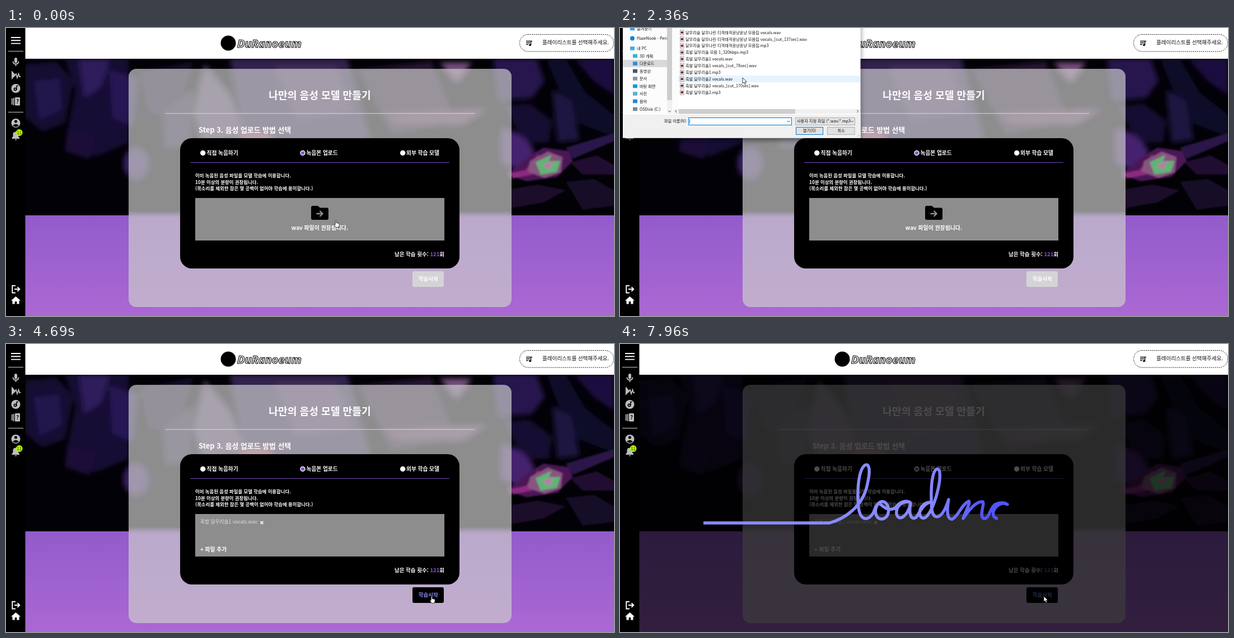
Animation, 1086 px wide and 515 px high, one loop 8000 ms. Source, as an HTML page:

```html
<!DOCTYPE html>
<html lang="ko">
<head>
<meta charset="utf-8">
<title>음성 모델 만들기</title>
<style>
  html, body { margin: 0; width: 100%; height: 100%; overflow: hidden; background: #000; }
  svg { display: block; width: 100vw; height: 100vh; }
  text { font-family: "Noto Sans CJK KR", "Noto Sans CJK", sans-serif; font-weight: 900; fill: #fff; white-space: pre; }
  #dialog text { font-size: 7.2px; font-weight: 400; fill: #111; }
  .mid { text-anchor: middle; }
  .end { text-anchor: end; }
  .medium { font-weight: 700; }
  .icon { fill: #bdbdbd; }
  .line { fill: none; stroke: #bdbdbd; stroke-width: 1.8; }
</style>
</head>
<body>
<svg viewBox="0 0 1086 515" preserveAspectRatio="none">
  <defs>
    <linearGradient id="floor" x2="0" y2="1"><stop stop-color="#925bcb"/><stop offset="1" stop-color="#ab68d3"/></linearGradient>
    <linearGradient id="ink" gradientUnits="userSpaceOnUse" x1="550" x2="645">
      <stop stop-color="#898aff"/><stop offset="1" stop-color="#5355f8"/>
    </linearGradient>
    <filter id="soft" x="-20%" y="-20%" width="140%" height="140%"><feGaussianBlur stdDeviation="5"/></filter>
    <filter id="softer" x="-20%" y="-20%" width="140%" height="140%"><feGaussianBlur stdDeviation="1.5"/></filter>
    <filter id="frost"><feGaussianBlur stdDeviation="3.5"/></filter>
    <filter id="shade" x="-10%" y="-10%" width="120%" height="130%"><feDropShadow dx="0" dy="4" stdDeviation="5" flood-opacity=".5"/></filter>
    <clipPath id="stageClip"><rect x="34" y="55" width="1052" height="280"/></clipPath>
    <clipPath id="cardClip"><rect x="219" y="73" width="684" height="426" rx="14"/></clipPath>
    <clipPath id="navClip"><rect x="5" y="-20" width="79" height="175"/></clipPath>
  </defs>

  <g id="backdrop">
    <rect x="34" y="55" width="1052" height="280" fill="#020106"/>
    <g clip-path="url(#stageClip)">
      <g filter="url(#soft)">
        <path d="M34 65 90 60 120 95 105 170 65 185 34 160Z" fill="#150d33"/>
        <path d="M50 95 95 90 100 145 60 165Z" fill="#24164d"/>
        <path d="M105 55H219V205L160 230 110 185 125 110Z" fill="#170e36"/>
        <path d="M130 55H185L170 105 140 125Z" fill="#2d1b5c"/>
        <path d="M185 75 235 90 225 175 190 160Z" fill="#281852"/>
        <path d="M110 180 160 195 150 235 105 220Z" fill="#1b1038"/>
        <ellipse cx="232" cy="242" rx="22" ry="28" fill="#3b2463"/>
        <path d="M240 80 335 60 300 160 255 150Z" fill="#160f2c"/>
        <path d="M355 65 400 120 430 195 350 205 335 150Z" fill="#59456b"/>
        <path d="M280 150 335 110 330 210 285 215Z" fill="#281b3d"/>
        <path d="M400 55H610L650 200 480 250 420 170Z" fill="#33204d"/>
        <path d="M480 70H590L620 150 520 165Z" fill="#48315d"/>
        <ellipse cx="445" cy="197" rx="30" ry="11" fill="#a54f68"/>
        <path d="M630 75 760 60 800 165 690 190Z" fill="#251631"/>
        <path d="M675 155 860 145 815 172 700 170Z" fill="#5d3b5b"/>
        <path d="M775 62H832L805 98Z" fill="#75507d"/>
        <path d="M870 55H948L962 95 940 125 880 130Z" fill="#28164e"/>
        <path d="M890 140 935 135 975 165 970 205 925 205Z" fill="#180d33"/>
        <path d="M885 180Q925 185 945 222L928 262 885 240Z" fill="#44226e"/>
        <path d="M965 55H1000L1035 115 1086 155V195L1010 165Z" fill="#110a2a"/>
        <path d="M1015 55H1086V120L1050 95Z" fill="#1c1140"/>
        <path d="M975 110 1010 130 1025 200 985 205Z" fill="#1e123f"/>
      </g>
      <g filter="url(#softer)">
        <path d="M895 262 930 232 960 214 1005 220 1012 238 985 266 930 274Z" fill="#4b1857"/>
        <path d="M900 260 928 254 950 226 962 238 940 262 905 269Z" fill="#8d2a80"/>
        <path d="M936 238 968 221 994 231 991 258 962 268 932 257Z" fill="#87557f"/>
        <path d="M946 240 974 227 970 238 990 238 984 257 955 262Z" fill="#61b477"/>
        <path d="M957 246 977 237 972 253Z" fill="#b97da4"/>
        <path d="M1000 214 1086 188V202L1012 234Z" fill="#2a1448"/>
        <path d="M1008 240 1055 228 1086 245V262L1030 262Z" fill="#241033"/>
        <path d="M903 288 950 280 1000 290 960 312 903 322Z" fill="#1a0e2c"/>
        <path d="M1000 275 1050 270 1086 290V318L1030 325Z" fill="#170c28"/>
      </g>
    </g>
    <rect x="34" y="335" width="1052" height="180" fill="url(#floor)"/>
  </g>

  <g clip-path="url(#cardClip)">
    <use href="#backdrop" filter="url(#frost)"/>
    <rect x="219" y="73" width="684" height="426" fill="#ccc" fill-opacity=".69"/>
  </g>
  <text x="560.5" y="126.5" class="mid" font-size="18.2">나만의 음성 모델 만들기</text>
  <path d="M284 152.800H838" stroke="#dcd8e0"/>
  <text x="344" y="187" font-size="12.9">Step 3. 음성 업로드 방법 선택</text>
  <rect x="311" y="197" width="499" height="233" rx="21"/>
  <path d="M329 240.500H792" stroke="#7342bd"/>
  <g fill="#fff">
    <circle cx="351.7" cy="223.5" r="4.7"/>
    <circle cx="530" cy="223.5" r="4.7"/><circle cx="530" cy="223.5" r="3.3" fill="#8d52d8"/>
    <circle cx="708.7" cy="223.5" r="4.7"/>
  </g>
  <g font-size="9.7">
    <text x="358.5" y="227">직접 녹음하기</text>
    <text x="536.5" y="227">녹음본 업로드</text>
    <text x="715" y="227">외부 학습 모델</text>
  </g>
  <g font-size="8.4">
    <text x="338" y="267">이미 녹음된 음성 파일을 모델 학습에 이용합니다.</text>
    <text x="338" y="278.6">10분 이상의 분량이 권장됩니다.</text>
    <text x="338" y="290.4">(목소리를 제외한 잡은 몇 공백이 없어야 학습에 용이합니다.)</text>
  </g>
  <rect x="338" y="304" width="445" height="76" fill="#8d8d8d"/>
  <g id="emptyDrop">
    <path d="M548 318H557L561 321.500H573Q576 321.500 576 324.500V340Q576 343 573 343H548Q545 343 545 340V321Q545 318 548 318Z"/>
    <path d="M554.500 332H565M560.500 327 565.500 332 560.500 337" fill="none" stroke="#8d8d8d" stroke-width="2.3"/>
    <text x="560.5" y="360.7" class="mid medium" font-size="9.9">wav 파일이 권장됩니다.</text>
  </g>
  <g id="chosenFile">
    <text x="347" y="321.4" font-size="8.7" style="font-weight:300;fill:#e2e2e2">흑발 달무리솔1 vocals.wav</text>
    <path d="M454.500 317 459.500 322M459.500 317 454.500 322" stroke="#fff" stroke-width="1.7"/>
    <text x="347" y="370.5" class="medium" font-size="9.8">+ 파일 추가</text>
  </g>
  <text x="783" y="407.8" class="end medium" font-size="9.5">남은 학습 횟수: <tspan fill="#8d52d8">121</tspan>회</text>
  <rect id="startButton" x="726" y="435" width="56" height="28" rx="3"/>
  <text id="startLabel" x="754.2" y="452" class="mid medium" font-size="9.5">학습시작</text>

  <rect x="34" width="1052" height="55" fill="#fff"/>
  <circle cx="397" cy="27" r="13.5"/>
  <text x="413" y="35" font-size="20" style="font-family:'Open Sans',sans-serif;font-weight:700;font-style:italic;stroke:#111;stroke-width:1.2">DuRanoeum</text>
  <rect x="917.5" y="11.5" width="168" height="30.5" rx="15.2" fill="#fff" stroke="#111" stroke-dasharray="2 1.6"/>
  <path d="M929 23.500H939M929 26.500H936M929 29.500H933M937.500 31V23.500H940" fill="none" stroke="#111" stroke-width="1.5"/>
  <circle cx="936" cy="30.3" r="1.9"/>
  <text x="958" y="29.2" font-size="9.5" style="font-weight:500;fill:#111">플레이리스트를 선택해주세요.</text>

  <rect width="34.5" height="515"/>
  <path d="M9 17H26M9 22.300H26M9 27.600H26" stroke="#fff" stroke-width="1.9"/>
  <path d="M4 41.500H31M4 150.500H31" stroke="#ccc"/>
  <rect x="15" y="53" width="5" height="9.5" rx="2.5" class="icon"/>
  <path class="line" d="M12.500 59.500Q12.500 64.500 17.500 64.500T22.500 59.500M17.500 64V68"/>
  <path class="icon" d="M10 76 17 84 10 92Z"/>
  <path class="line" d="M14 87 18 82 20 89 22.500 82 24 87H26"/>
  <circle cx="17.5" cy="108" r="8" class="icon"/><circle cx="16.5" cy="109.5" r="3"/>
  <path d="M19 110V103.500H22" fill="none" stroke="#000" stroke-width="1.5"/>
  <circle cx="16.5" cy="109.5" r="1.2" class="icon"/>
  <path class="line" d="M10.800 126V137M13.700 125V138"/><rect x="16" y="124" width="9" height="14.5" rx="1" class="icon"/>
  <text x="20.5" y="135" class="mid" font-size="10" style="fill:#000">?</text>
  <circle cx="17.5" cy="170" r="8" class="icon"/><circle cx="17.5" cy="167" r="2.6"/><path d="M12 174.500Q17.500 169 23 174.500 17.500 179 12 174.500Z"/>
  <path class="icon" d="M10.500 198V196.500L12.500 194V190Q12.500 186 17 185.500 22 186 22 190V194L24 196.500V198ZM15.500 199H19.500Q17.500 202.500 15.500 199Z"/>
  <circle cx="23.7" cy="187" r="5.9" fill="#b5f500"/>
  <text x="23.7" y="189.8" class="mid" font-size="7.5" style="font-weight:500;fill:#222">11</text>
  <path d="M17 460.700H11.300V473.500H17M15 467H24M20.500 463.300 24.300 467 20.500 470.700" fill="none" stroke="#fff" stroke-width="1.9"/>
  <path d="M9 487.500 17.500 480 26 487.500H23.500V493.500H19.300V489H15.700V493.500H11.500V487.500Z" fill="#fff"/>

  <g id="dialog"></g>

  <g id="loading">
    <rect x="34" y="55" width="1052" height="460" fill="#000" fill-opacity=".7"/>
    <path id="script" pathLength="1" fill="none" stroke="url(#ink)" stroke-width="5.4" stroke-linejoin="round" d="M149 320H374
      C400 313 434 292 442 250C449 219 443 213 437 217C426 226 423 262 426 292C429 316 443 318 453 301
      C457 287 464 280 471 282C484 287 482 312 468 313C454 313 453 292 463 284C474 296 482 298 492 293
      C500 282 510 279 518 283C506 280 492 289 494 304C498 319 514 308 519 285C515 307 521 315 529 310
      C536 300 543 283 556 283C541 282 533 296 536 307C543 320 556 303 565 272C574 240 573 220 565 224
      C555 232 555 272 557 296C560 317 576 314 587 278C583 301 585 315 594 313C605 307 609 288 623 281
      C627 283 616 302 613 312C624 296 636 281 648 282C652 286 641 306 649 312C660 314 660 294 670 287
      C680 282 688 284 692 287C680 280 664 294 667 307C674 320 690 303 697 285C692 318 688 360 676 379
      C664 392 653 377 666 358C684 332 724 294 792 291H972"/>
  </g>

  <g id="cursor" stroke="#111" stroke-width=".8" fill="#fff">
    <path id="arrow" d="M0 0V10L2.400 7.900 4 11.600 5.800 10.900 4.200 7.200H7.300Z"/>
    <path id="hand" d="M.2 1Q1.200 -.5 2.200 1V4.400L6.600 5.400Q7.600 6 7.300 8L6.300 12.400H1.400L-1.600 8.200Q-1.800 6.600 .2 7.400Z"/>
  </g>
</svg>

<script>
const LOOP = 8000, ROW = 11.9;
const $ = id => document.getElementById(id);
const clamp = v => Math.max(0, Math.min(1, v));
const show = (id, on) => $(id).setAttribute("display", on ? "inline" : "none");

const duet = "달무리솔 달무나린 티격태격꽁냥꽁냥 모음집", solo = "흑발 달무리솔";
const files = [
  `${duet} vocals.wav`, `${duet} vocals_[cut_137sec].wav`, `${duet}.mp3`, `${solo} 모음 1_320kbps.mp3`,
  `${solo}1 vocals.wav`, `${solo}1 vocals_[cut_78sec].wav`, `${solo}1.mp3`,
  `${solo}2 vocals.wav`, `${solo}2 vocals_[cut_170sec].wav`, `${solo}2.mp3`
];
// Label, centre y, indent, icon colour
const places = [
  ["즐겨찾기", 1, 0, "#3b9be8"], ["HazeNook - Perso", 18.5, 0, "#1683d8"], ["내 PC", 36.5, 0, "#4ba9d8"],
  ["3D 개체", 50, 5, "#36b4cc"], ["다운로드", 63.5, 5, "#2d8de0"], ["동영상", 77, 5, "#46546c"],
  ["문서", 90.5, 5, "#8797a8"], ["바탕 화면", 104, 5, "#1998e5"], ["사진", 117.5, 5, "#5bb1cf"],
  ["음악", 131, 5, "#2487dc"], ["OSDisk (C:)", 145, 5, "#7d8891"]
];

const label = (x, y, s, attrs = "") => `<text x="${x}" y="${y + 2.6}" ${attrs}>${s}</text>`;
const box = (x, y, w, h, fill, stroke = "none") =>
  `<rect x="${x}" y="${y}" width="${w}" height="${h}" fill="${fill}" stroke="${stroke}"/>`;
const chevron = (x, y, turn) =>
  `<path d="M-2.2 -1.1 0 1.1 2.2 -1.1" fill="none" stroke="#444" transform="translate(${x} ${y}) rotate(${turn})"/>`;

const placeIcon = (name, x, y, color) => name.startsWith("HazeNook")
  ? `<circle cx="${x + 4}" cy="${y}" r="4" fill="${color}"/>`
  : box(x, y - 3.3, 8, 6.6, color);

$("dialog").innerHTML =
  `<g filter="url(#shade)">${box(5, -95, 424.5, 291.5, "#fff")}</g>` +
  box(5, 155, 424.5, 41.5, "#f0f0f0") + box(5, -95, 99, 250, "#fcfcfc") + box(5, 57, 79, 13, "#d9d9d9") +
  `<g clip-path="url(#navClip)">` + places.map(([name, y, indent, color]) =>
    placeIcon(name, 18 + indent, y, color) + label(30 + indent, y, name)).join("") + `</g>` +
  box(84, -95, 9, 248, "#f0f0f0") + box(84, -95, 9, 224, "#cdcdcd") + chevron(88.5, 149, 0) +
  box(95, 145, 334, 8.5, "#f0f0f0") + box(105, 145, 208, 8.5, "#cdcdcd") +
  chevron(100, 149, 90) + chevron(424.5, 149, -90) +
  `<rect id="hover" x="104" width="325" height="${ROW}"/>` +
  files.map((name, i) => {
    const y = 8 + i * ROW;
    return box(107.5, y - 4.2, 6.5, 8.4, "#fff", "#999") +
      `<circle cx="110.8" cy="${y}" r="2.3" fill="#7d2330"/>` + label(117, y, name);
  }).join("") +
  label(119.5, 166.5, "파일 이름(N):", 'class="end"') +
  box(122.5, 160.5, 184, 13, "#fff", "#0078d7") + chevron(301, 167, 0) +
  box(313.5, 160.5, 106, 13, "#e3e3e3", "#adadad") + label(316, 166.5, "사용자 지정 파일 (*.wav;*.mp3") + chevron(414.5, 167, 0) +
  box(314.5, 177.5, 48, 13, "#e1e1e1", "#0078d7") + label(338.5, 183.5, "열기(O)", 'class="mid"') +
  box(370.5, 177.5, 48.5, 13, "#e1e1e1", "#adadad") + label(395, 183.5, "취소", 'class="mid"') +
  `<path d="M124.5 163V171" stroke="#222" stroke-width=".7"/>` +
  `<path d="M424 194.5 427.5 191" stroke="#aaa"/>`;

// Start time, steps of 100 ms, destination
const moves = [
  [310, 4, 557, 332], [1750, 4, 262, 158], [2260, 2, 219, 89], [2460, 1, 216, 66],
  [2560, 3, 228, 157], [2970, 3, 207, 55], [3890, 9, 759, 451], [5750, 1, 757, 451]
];

function cursorAt(t) {
  let x = 588, y = 344;
  for (const [start, steps, toX, toY] of moves) {
    if (t < start) break;
    const k = clamp((Math.floor((t - start) / 100) + 1) / steps);
    const eased = k * (2 - k);
    x += (toX - x) * eased;
    y += (toY - y) * eased;
  }
  return [x, y];
}

function drawDialog(t, x, y) {
  const open = t >= 1450 && t < 3580;
  show("dialog", open);
  if (!open) return;
  const fading = t < 1550 || t >= 3480;
  $("dialog").setAttribute("opacity", fading ? .55 : 1);
  $("dialog").setAttribute("transform", fading ? "translate(217 50) scale(.972) translate(-217 -50)" : "");
  const row = Math.floor((y - 2) / ROW);
  show("hover", x > 104 && x < 429 && row >= 0 && row < files.length);
  $("hover").setAttribute("y", 2 + row * ROW);
  $("hover").setAttribute("fill", t >= 3380 ? "#cce8ff" : "#e5f3ff");
}

function drawLoading(t) {
  show("loading", t >= 5750);
  if (t < 5750) return;
  const base = t < 7660 ? 5750 : 7760;
  const snapped = base + Math.floor((t - base) / 100) * 100;
  const phase = (snapped - 5683) % 2000;
  const head = 1 - (1 - clamp(phase / 980)) ** 4;
  const tail = clamp((phase - 796) / 1069);
  show("script", head - tail > .001 && phase > 70);
  $("script").setAttribute("stroke-dasharray", `${Math.max(0, head - tail)} 2`);
  $("script").setAttribute("stroke-dashoffset", -tail);
}

function draw() {
  const t = performance.now() % LOOP;
  const [x, y] = cursorAt(t);
  const chosen = t >= 3480;
  const onButton = t >= 4490;
  const pointing = t < 1140 || (onButton && t < 5750);

  show("emptyDrop", !chosen);
  show("chosenFile", chosen);
  $("startButton").setAttribute("fill", chosen ? "#000" : "#d5d3d7");
  $("startLabel").style.fill = onButton ? "#8587f5" : "#fff";
  drawDialog(t, x, y);
  drawLoading(t);
  $("cursor").setAttribute("transform", `translate(${x} ${y})`);
  show("arrow", !pointing);
  show("hand", pointing);
  requestAnimationFrame(draw);
}
draw();
</script>
</body>
</html>
```
